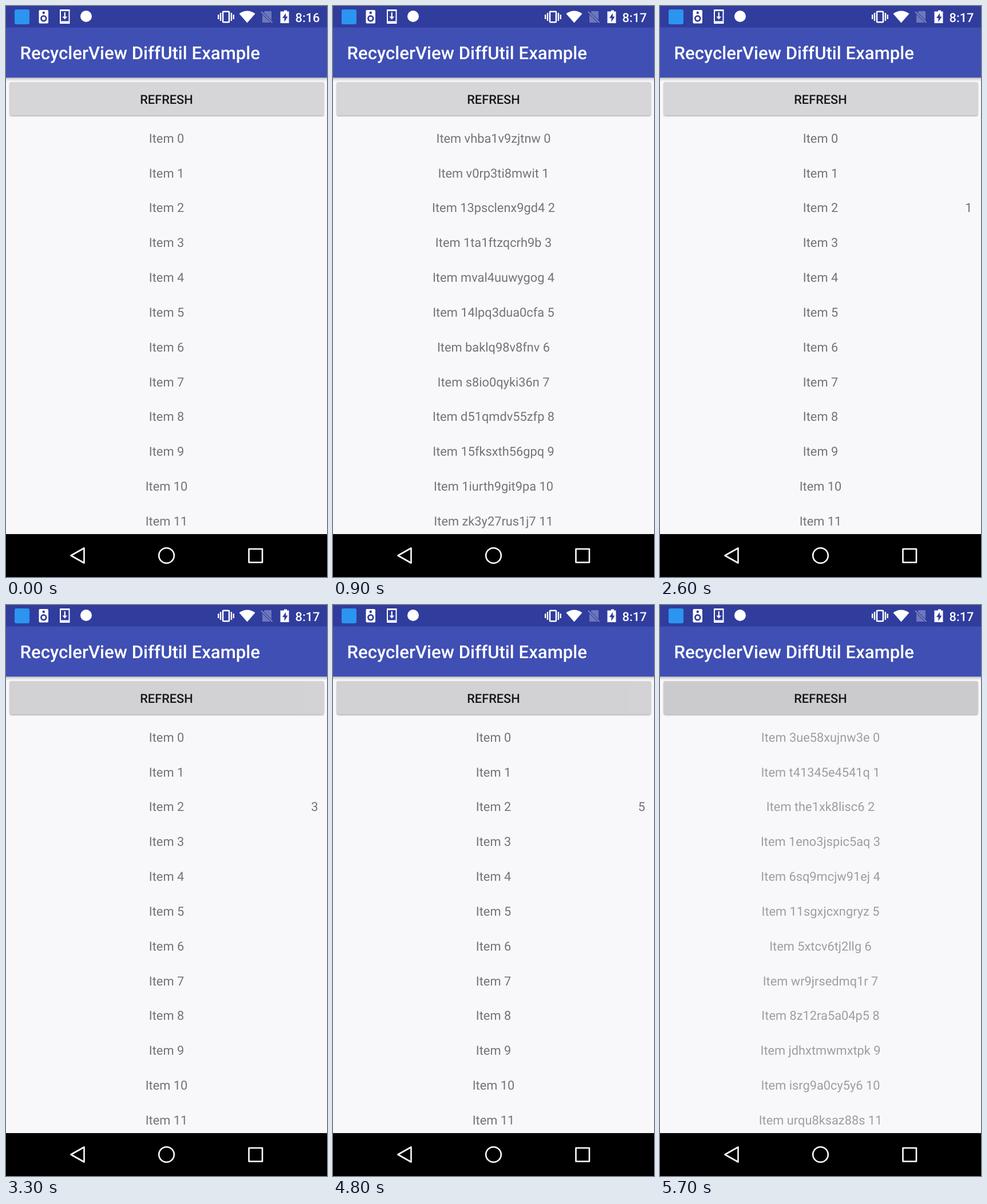
Recreate the animation shown at these times as an HTML page. Size 561 by 998 pixels, loop 5.8 s.

```html
<!DOCTYPE html>
<html lang="en">
<head>
<meta charset="utf-8">
<title>RecyclerView DiffUtil Example</title>
<style>
  html, body { margin: 0; width: 100%; height: 100%; overflow: hidden; background: #f8f7fa; }
  svg { display: block; width: 561px; height: 998px; }
  text { font: 400 21.8px Roboto, sans-serif; text-rendering: geometricPrecision; }
  .medium { font-weight: 500; }
  .list { fill: #747376; text-anchor: middle; }
  .count { text-anchor: end; }
  .line { fill: none; stroke: #fff; stroke-width: 2.6; stroke-linejoin: round; }
</style>
</head>
<body>
<svg viewBox="0 0 561 998">
  <defs>
    <linearGradient id="shade" x2="0" y2="1">
      <stop stop-color="#000" stop-opacity=".3"/>
      <stop offset=".4" stop-color="#000" stop-opacity=".1"/>
      <stop offset="1" stop-color="#000" stop-opacity="0"/>
    </linearGradient>
    <filter id="soft" x="-5%" y="-20%" width="110%" height="140%"><feGaussianBlur stdDeviation="1.3"/></filter>
  </defs>
  <rect width="561" height="998" fill="#f8f7fa"/>

  <rect x="6.5" y="134.5" width="549" height="58" rx="3" opacity=".3" filter="url(#soft)"/>
  <rect x="6" y="133" width="550" height="58" rx="3" fill="#d6d5d8"/>
  <rect id="press" x="6" y="133" width="550" height="58" rx="3" opacity="0" fill="#c9c8cb"/>
  <text class="medium" x="280.5" y="170.7" text-anchor="middle" fill="#18171a">REFRESH</text>

  <g id="lists"></g>

  <rect width="561" height="38" fill="#303d9d"/>
  <rect y="37.5" width="561" height="87.5" fill="#3f4fb4"/>
  <rect y="125" width="561" height="7" fill="url(#shade)"/>
  <text class="medium" x="24.5" y="93.2" fill="#fff" style="font-size:31.17px">RecyclerView DiffUtil Example</text>

  <rect x="15" y="6" width="26" height="26" rx="3" fill="#2b95ef"/>
  <g fill="#fff">
    <rect x="57.5" y="7" width="16.5" height="23.5" rx="2"/>
    <g fill="#303d9d">
      <circle cx="65.8" cy="11.8" r="2.2"/>
      <circle cx="65.8" cy="21.8" r="5.8"/>
    </g>
    <circle cx="65.8" cy="21.8" r="3"/>
    <path fill-rule="evenodd" d="M94 6h17.5v25H94zM96 9v17.5h13.500V9z"/>
    <path d="M101.700 11h2.200v7.500h3.300l-4.400 5-4.400-5h3.300z"/>
    <circle cx="140" cy="18" r="10"/>
    <path d="M370 15h2.300v8H370zM373.800 12h2.300v14h-2.300zM392.800 12h2.300v14h-2.300zM396.600 15h2.300v8h-2.300z"/>
    <rect class="line" x="379" y="9.800" width="11" height="18.400" rx="1"/>
    <path d="M407.500 13.500Q421.500 3.500 435.500 13.500L421.500 29.500z"/>
    <path d="M483.500 9.500h2.500V7.500h5v2h3.500V30h-15V9.500z"/>
    <path fill="#303d9d" d="M489 12.500v6h3.500L486.500 28v-7H483z"/>
    <path opacity=".3" d="M452 9h12v20h-16V15z"/>
    <path d="M446 10l19.500 19" stroke="#303d9d" stroke-width="4"/>
    <path d="M446 10l19.500 19" stroke="#8189c3" stroke-width="1.800"/>
    <text id="before" class="medium" x="505.500" y="27.500">8:16</text>
    <text id="after" class="medium" x="505.500" y="27.500" opacity="0">8:17</text>
  </g>

  <rect y="923" width="561" height="75"/>
  <path class="line" d="M113.500 960.500L136.500 947.500V973.500z"/>
  <circle class="line" cx="280.500" cy="960.500" r="13.300"/>
  <rect class="line" x="424.500" y="949" width="23.500" height="23.500"/>
</svg>
<script>
  const LOOP = 5800, ROW = 60.82, FIRST_BASELINE = 238.8;
  const lists = document.getElementById('lists');

  function add(tag, parent, attrs, text = '') {
    const el = document.createElementNS('http://www.w3.org/2000/svg', tag);
    for (const key in attrs) el.setAttribute(key, attrs[key]);
    el.textContent = text;
    return parent.appendChild(el);
  }

  // Holds each [time, opacity] until the next one.
  function hold(el, ...steps) {
    const frames = steps.map(([time, opacity]) => ({ offset: time / LOOP, opacity, easing: 'steps(1, end)' }));
    frames.push({ offset: 1, opacity: steps[steps.length - 1][1] });
    el.animate(frames, { duration: LOOP, iterations: Infinity, delay: -10 });
  }

  function makeList(words) {
    const group = add('g', lists, { class: 'list' });
    for (let i = 0; i < 12; i++) {
      const label = ['Item', words[i], i].filter(part => part !== undefined).join(' ');
      add('text', group, { x: 280.5, y: FIRST_BASELINE + ROW * i }, label);
    }
    return group;
  }

  const plain = makeList([]);
  const firstWords = makeList(('vhba1v9zjtnw v0rp3ti8mwit 13psclenx9gd4 1ta1ftzqcrh9b mval4uuwygog 14lpq3dua0cfa ' +
    'baklq98v8fnv s8io0qyki36n d51qmdv55zfp 15fksxth56gpq 1iurth9git9pa zk3y27rus1j7').split(' '));
  const lastWords = makeList(('3ue58xujnw3e t41345e4541q the1xk8lisc6 1eno3jspic5aq 6sq9mcjw91ej 11sgxjcxngryz ' +
    '5xtcv6tj2llg wr9jrsedmq1r 8z12ra5a04p5 jdhxtmwmxtpk isrg9a0cy5y6 urqu8ksaz88s').split(' '));

  hold(plain, [0, 1], [200, .68], [300, 0], [1800, .97], [1900, 1], [4900, .68], [5000, 0]);
  hold(firstWords, [0, 0], [300, .1], [400, 1], [1600, .85], [1700, 0]);
  hold(lastWords, [0, 0], [5000, .1], [5100, 1], [5700, .68]);

  const ticks = [1700, 2700, 3300, 3900, 4400, 5000];
  for (let n = 1; n < ticks.length; n++) {
    const count = add('text', plain, { class: 'count', x: 545.4, y: FIRST_BASELINE + ROW * 2 }, n);
    hold(count, [0, 0], [ticks[n - 1], 1], [ticks[n], 0]);
  }

  hold(document.getElementById('before'), [0, 1], [100, 0]);
  hold(document.getElementById('after'), [0, 0], [100, 1]);

  const taps = [100, 1500, 2600, 3200, 3800, 4300].flatMap(t => [[t + 100, .25], [t + 200, 0]]);
  hold(document.getElementById('press'), [0, 0], ...taps,
    [4800, .25], [4900, .4], [5200, .2], [5300, 0], [5400, .25], [5500, .45], [5600, .65], [5700, .8]);
</script>
</body>
</html>
```
